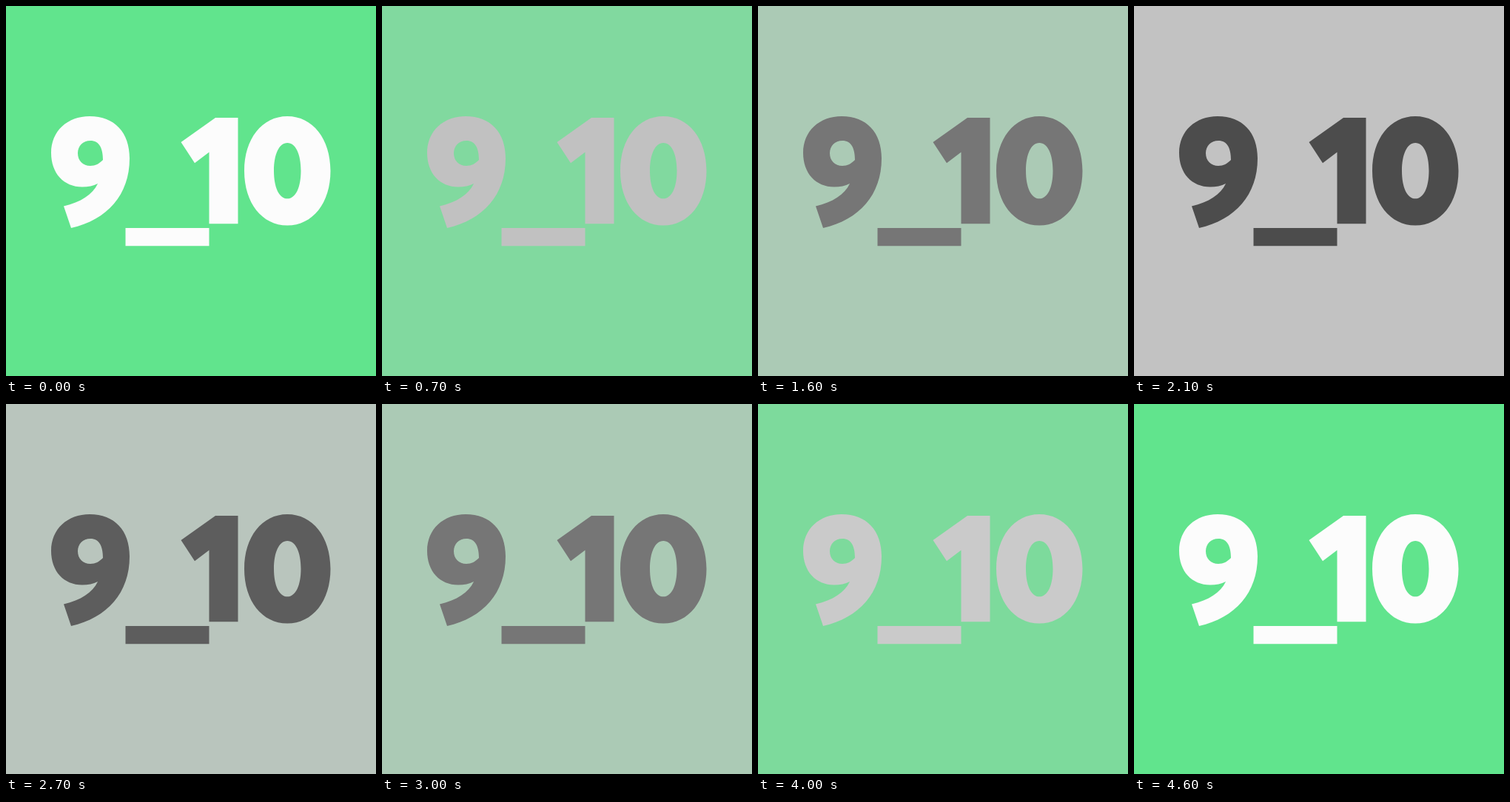
An HTML page for the animation above (4700 ms loop, 500 by 500 pixels).

```html
<!DOCTYPE html>
<html lang="en">
<head>
<meta charset="utf-8">
<title>9_10</title>
<style>
  @property --p {
    syntax: "<percentage>";
    inherits: true;
    initial-value: 0%;
  }
  html, body {
    margin: 0;
    width: 100%;
    height: 100%;
    overflow: hidden;
  }
  body {
    --p: 0%;
    background: color-mix(in srgb, #c2c2c2 var(--p), #61e48d);
    animation: fade 4700ms -4ms infinite;
  }
  svg {
    display: block;
    width: 100%;
    height: 100%;
    fill: color-mix(in srgb, #4c4c4c var(--p), #fcfcfc);
  }
  /* Linear fade in 100 ms ticks, with a short pause on the way and a hold at the end */
  @keyframes fade {
    0%        { --p: 0%;      animation-timing-function: steps(7); }
    14.89362% { --p: 33.333%; animation-timing-function: step-end; }
    19.14894% { --p: 42.857%; animation-timing-function: steps(12); }
    44.68085% { --p: 100%;    animation-timing-function: step-end; }
    53.19149% { --p: 100%;    animation-timing-function: steps(13); }
    80.85106% { --p: 38.095%; animation-timing-function: step-end; }
    85.10638% { --p: 28.571%; animation-timing-function: steps(6); }
    97.87234% { --p: 0%;      animation-timing-function: step-end; }
    100%      { --p: 0%; }
  }
</style>
</head>
<body>
<svg viewBox="0 0 500 500" role="img" aria-label="9_10" fill-rule="evenodd">
  <path d="M88 300L78 270.500C101 265 117 255 124 240C118 243 111 244.500 103 244.500C78 244.500 61 226 61 198.500C61 169 83 149 113 149C147 149 167 171 167 206C167 255 137 289 88 300Z
           M114 182C104 182 97 189 97 199C97 209 104 216 114 216C121 216 126 213 131 208C131 192 126 182 114 182Z"/>
  <path d="M161.500 300H274.500V324.300H161.500Z"/>
  <path d="M283 151H313.500V294.300H274.500V197.500L255 212.300L236.500 184Z"/>
  <path d="M380.200 149C414.500 149 438.500 179.500 438.500 222.700C438.500 266 414.500 296.500 380.200 296.500C346 296.500 322 266 322 222.700C322 179.500 346 149 380.200 149Z
           M380.200 185C369 185 362 200.500 362 222.700C362 245 369 260.300 380.200 260.300C391.500 260.300 398.500 245 398.500 222.700C398.500 200.500 391.500 185 380.200 185Z"/>
</svg>
</body>
</html>
```
